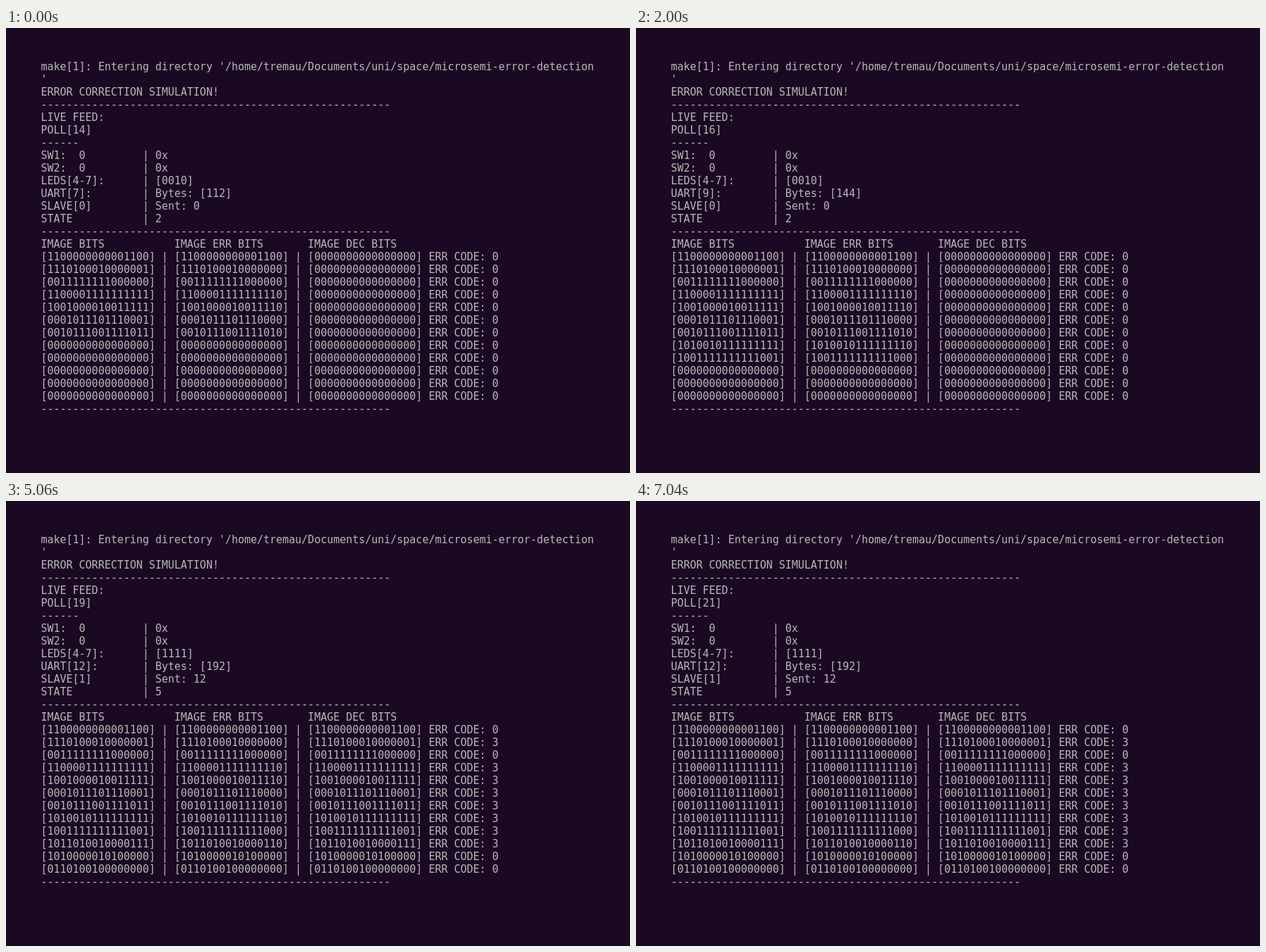
Animation of 885 by 632 pixels, one loop 8000 ms. Source, as an HTML page:

```html
<!DOCTYPE html>
<html lang="en">
<head>
<meta charset="utf-8">
<title>Error correction simulation</title>
<style>
  html, body {
    margin: 0;
    width: 100%;
    height: 100%;
    overflow: hidden;
    background: #1b0924;
  }
  #term {
    position: absolute;
    left: 49.5px;
    top: 46px;
    margin: 0;
    color: #b8b8b4;
    font: 15px/18px "DejaVu Sans Mono", monospace;
    letter-spacing: -0.016px;
    white-space: pre;
  }
</style>
</head>
<body>
<pre id="term"></pre>
<script>
const LOOP = 8000;
const POLL_TIMES = [0, 920, 2000, 3080, 4060, 5060, 6040, 7040];
const FIRST_POLL = 14;
const FIRST_WORDS = 7;
const WORDS = [
  "1100000000001100", "1110100010000001", "0011111111000000",
  "1100001111111111", "1001000010011111", "0001011101110001",
  "0010111001111011", "1010010111111111", "1001111111111001",
  "1011010010000111", "1010000010100000", "0110100100000000"
];
const EMPTY = "0".repeat(16);
const RULE = "-".repeat(55);

const field = (label, value) => label.padEnd(16) + "| " + value;

// The channel error clears the lowest bit of each word.
const corrupt = word => word.slice(0, -1) + "0";

function wordRow(word, index, received, decoded) {
  const sent = index < received ? word : EMPTY;
  const damaged = corrupt(sent);
  const fixed = decoded ? sent : EMPTY;
  const code = decoded && damaged !== sent ? 3 : 0;
  return `[${sent}] | [${damaged}] | [${fixed}] ERR CODE: ${code}`;
}

function screen(step) {
  const received = Math.min(FIRST_WORDS + step, WORDS.length);
  const decoded = received === WORDS.length;
  return [
    "make[1]: Entering directory '/home/tremau/Documents/uni/space/microsemi-error-detection",
    "'",
    "ERROR CORRECTION SIMULATION!",
    RULE,
    "LIVE FEED:",
    `POLL[${FIRST_POLL + step}]`,
    "------",
    field("SW1:  0", "0x"),
    field("SW2:  0", "0x"),
    field("LEDS[4-7]:", decoded ? "[1111]" : "[0010]"),
    field(`UART[${received}]:`, `Bytes: [${received * 16}]`),
    field(`SLAVE[${decoded ? 1 : 0}]`, `Sent: ${decoded ? received : 0}`),
    field("STATE", decoded ? 5 : 2),
    RULE,
    "IMAGE BITS".padEnd(21) + "IMAGE ERR BITS".padEnd(21) + "IMAGE DEC BITS",
    ...WORDS.map((word, i) => wordRow(word, i, received, decoded)),
    RULE
  ].join("\n");
}

const term = document.getElementById("term");
let shown = -1;

function draw() {
  const time = performance.now() % LOOP;
  const step = POLL_TIMES.filter(start => start <= time).length - 1;
  if (step !== shown) {
    term.textContent = screen(step);
    shown = step;
  }
  requestAnimationFrame(draw);
}
draw();
</script>
</body>
</html>
```
